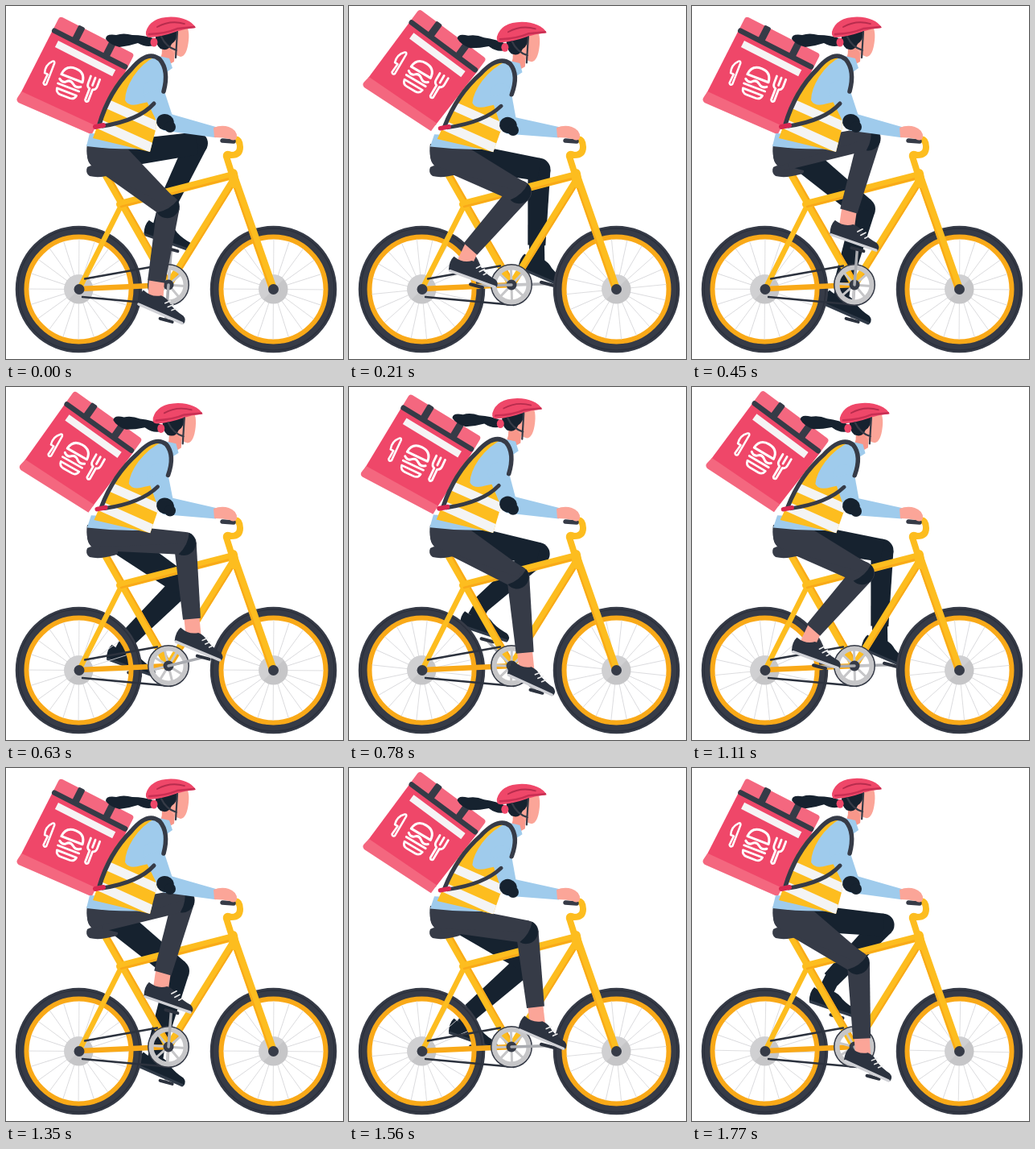
An HTML page with a canvas for the animation above (1.8 s loop, 419x438 px).

```html
<!DOCTYPE html>
<html>
<head>
<meta charset="utf-8">
<style>
html, body { margin: 0; width: 100%; height: 100%; overflow: hidden; background: #fff }
canvas { display: block }
</style>
</head>
<body>
<canvas id="stage" width="419" height="438"></canvas>
<script>
const c = document.getElementById('stage').getContext('2d');
const TAU = Math.PI * 2, RAD = Math.PI / 180;
const DARK = '#363b47', NAVY = '#16222f', YELLOW = '#fdbd1f', AMBER = '#f9a918',
  RED = '#ef4769', PINK = '#f4677f', SKIN = '#fba598', BLUE = '#9fcbec', GREY = '#c6c6c8';

function fill(d, color) {
  c.fillStyle = color;
  c.fill(new Path2D(d));
}

function line(d, color, w, cap = 'round') {
  c.strokeStyle = color;
  c.lineWidth = w;
  c.lineCap = cap;
  c.lineJoin = 'round';
  c.stroke(new Path2D(d));
}

function disc(x, y, r, color, ry = r, turn = 0) {
  c.fillStyle = color;
  c.beginPath();
  c.ellipse(x, y, r, ry, turn, 0, TAU);
  c.fill();
}

function ring(x, y, r, color, w) {
  c.strokeStyle = color;
  c.lineWidth = w;
  c.beginPath();
  c.arc(x, y, r, 0, TAU);
  c.stroke();
}

function rect(x, y, w, h, color, r = 0) {
  c.fillStyle = color;
  c.beginPath();
  c.roundRect(x, y, w, h, r);
  c.fill();
}

// Draws in a temporary coordinate system
function group(x, y, turn, draw) {
  c.save();
  c.translate(x, y);
  c.rotate(turn);
  draw();
  c.restore();
}

// Upper body shears forward while the waist stays in place
function leaning(lean, draw) {
  c.save();
  c.transform(1, 0, -.08 * lean, 1 - .05 * lean, 14.8 * lean, 9.25 * lean);
  draw();
  c.restore();
}

// Tapered limb with a rounded start
function limb([x, y], r, [u, v], s, color) {
  const a = Math.atan2(v - y, u - x) + Math.PI / 2, p = Math.cos(a), q = Math.sin(a);
  disc(x, y, r, color);
  fill(`M${x + p * r} ${y + q * r}L${u + p * s} ${v + q * s}L${u - p * s} ${v - q * s}L${x - p * r} ${y - q * r}Z`, color);
}

// Turn of wheels and crank, lagging just before each round is completed
function rotation(ms) {
  const t = ms % 900;
  const deg = t < 780 ? t * .4 : t < 870 ? 312 + (t - 780) * 12 / 90 : 324 + (t - 870) * 1.2;
  return deg * RAD;
}

function wheel(x, turn) {
  const y = 351.5;
  ring(x, y, 73, DARK, 11.5);
  ring(x, y, 75.5, '#2b303c', 1.5);
  ring(x, y, 65, AMBER, 6);
  group(x, y, turn, () => {
    for (let i = 0; i < 20; i++) {
      c.rotate(TAU / 20);
      line('M17 0L62 0', '#d6d6d9', .8);
    }
  });
  disc(x, y, 18, GREY);
  fill(`M${x - 13} ${y + 13}A18 18 0 0 1 ${x + 13} ${y - 13}L${x} ${y}Z`, '#d0d0d2');
}

function shoe(x, y, a, far) {
  group(x, y, (20 + 3 * Math.cos(a - .9)) * RAD, () => {
    fill('M-14 25Q-17 14 -13 7Q0 12 10 5Q18 5 25 11Q34 16 45 18Q51 21 49 27Z', far ? NAVY : '#2c3340');
    line('M-12 25.5L47 27', far ? '#303a48' : '#d0d1d6', 3.4);
    if (!far) line('M18 12L23 7M23 15L28 10M29 17L33 13', '#eee', 1.6);
  });
}

function leg(hip, a, far) {
  const thigh = 105, shin = 103, color = far ? NAVY : DARK;
  const ax = 189 + 44 * Math.cos(a), ay = 307 + 44 * Math.sin(a);
  const dx = ax - hip[0], dy = ay - hip[1], d = Math.hypot(dx, dy);
  const bend = Math.acos((thigh * thigh + d * d - shin * shin) / (2 * thigh * d));
  const k = Math.atan2(dy, dx) - bend;
  const knee = [hip[0] + thigh * Math.cos(k), hip[1] + thigh * Math.sin(k)];
  const ux = (ax - knee[0]) / shin, uy = (ay - knee[1]) / shin;
  line(`M${ax - ux * 12} ${ay - uy * 12}L${ax + ux * 4 + 1} ${ay + uy * 4 + 8}`, far ? NAVY : SKIN, 19, 'butt');
  shoe(ax, ay, a, far);
  limb(knee, 14, [ax - ux * 9, ay - uy * 9], 11, color);
  limb(hip, 17, knee, 14, color);
  if (!far) {
    const px = knee[0] + 13 * Math.sin(k), py = knee[1] - 13 * Math.cos(k);
    fill(`M101 171L152 178L${px} ${py}L${knee[0]} ${knee[1]}L108 199Q98 190 101 171Z`, DARK);
    group(...knee, k, () => fill('M4 -13.4A14 14 0 0 1 -7 14Q4 2 4 -13.4Z', NAVY));
  }
}

function crank(a) {
  const x = 202 + 44 * Math.cos(a), y = 346 + 44 * Math.sin(a);
  line(`M202 346L${x} ${y}`, '#a9abb0', 3.5);
  line(`M${x - 7} ${y - 2}L${x + 8} ${y + 2}`, '#2c323e', 4);
}

function bike(a) {
  // Frame
  line('M91 351L202 346', AMBER, 6.5);
  line('M91 351L144 246', YELLOW, 6.5);
  line('M122 206L202 346', YELLOW, 9.5);
  line('M125 205L205 343', AMBER, 2);
  line('M202 346L283 216', YELLOW, 9);
  line('M205 347L286 218', AMBER, 2);
  line('M142 246L282 210', YELLOW, 10);
  line('M143 249L282 213', AMBER, 2.5);
  line('M283 211L332 351', YELLOW, 10);
  line('M280 214L328 350', AMBER, 2);
  line('M282 208L284 220', YELLOW, 12);
  line('M281 209L275 190Q271 181 280 185Q291 185 291 175Q291 166 285 165', YELLOW, 8);
  fill('M101 200Q107 196 119 199L139 204Q140 208 134 209Q116 214 104 211Q98 207 101 200Z', DARK);
  // Chain and chainring
  line('M98 338.5L188 322.5M95 361L205 371', '#2c323e', 2.3);
  ring(202, 346, 25, DARK, 2);
  ring(202, 346, 21.5, GREY, 6);
  group(202, 346, a, () => {
    for (let i = 0; i < 8; i++) {
      c.rotate(TAU / 8);
      line('M6 0L20 0', GREY, 3);
    }
  });
  for (const x of [91, 332.5]) disc(x, 351.5, 6.5, DARK);
  disc(202, 346, 6.5, DARK);
}

function pack(lean) {
  group(130, 130, .17 * lean, () => {
    c.translate(-130, -130);
    group(67, 12.5, 27 * RAD, () => {
      rect(0, 0, 104, 22, PINK, 4);
      fill('M0 20H104L102 104L0 107Z', RED);
      fill('M0 105L102 101V113L3 119Q-2 118 -1 113Z', PINK);
      rect(-1, 16, 105, 6.5, DARK, 3);
      for (const x of [26, 69]) rect(x, -1, 9, 20, DARK, 2);
      rect(12, 28, 80, 9, '#f6f4f5');
      // Cutlery and burger
      group(49, 68, -6 * RAD, () => {
        c.translate(-52, -70);
        line('M22 53Q15 60 18 70L22 70L21 82Q23 85 25 82V54Q24 51 22 53Z', '#fff', 2.5);
        line('M38 64Q39 51 52 51Q65 51 66 64Z', '#fff', 3);
        line('M38 70Q43 74 47 70T56 70T66 70', '#fff', 3);
        line('M38 76H66M39 82H65Q64 88 58 88H46Q40 88 39 82Z', '#fff', 2.7);
        line('M73 53V62Q73 67 77 68V83Q79 86 81 83V68Q85 67 85 62V53M79 53V63', '#fff', 2.8);
      });
    });
  });
}

function head(lean, bob) {
  c.save();
  c.translate(10 * lean, 6 * lean + bob);
  group(184, 44, .12 * lean, () =>
    fill('M-60 -3Q-60 -10 -47 -8Q-38 -11 -27 -8Q-12 -8 2 -3V4Q-8 9 -20 2Q-32 6 -43 7Q-55 4 -60 -3Z', NAVY));
  fill('M193 46L211 44L209 69Q200 76 190 68Q196 61 193 46Z', '#f8978a');
  fill('M200 33L226 28Q228 34 227 43Q225 62 217 63Q207 61 204 50Z', SKIN);
  fill('M186 36L214 30Q213 43 206 47Q202 57 192 53Q185 47 186 36Z', NAVY);
  disc(184, 45, 4.5, RED, 5.5);
  fill('M174 32Q179 14 205 13.5Q228 14 236 27Q223 28 211 32Q194 38 179 39Q173 39 174 32Z', RED);
  line('M188 26Q204 17 222 22', '#b72c4d', 1.8);
  line('M178 35Q199 34 213 28L234 26', '#c92f53', 2.5);
  line('M213 32L211 64M193 38Q199 51 212 55', DARK, 2.2);
  c.restore();
}

function torso() {
  fill('M104 158L100 174Q140 179 179 177L182 162Z', BLUE);
  fill('M186 61L203 65L207 77L197 84Z', BLUE);
  const vest = 'M158 73Q178 56 192 64Q203 77 195 104L184 124L187 150L179 181L108 164Q114 148 121 126Q134 94 158 73Z';
  fill(vest, YELLOW);
  c.save();
  c.clip(new Path2D(vest));
  line('M116 117L192 151', '#f4f4f4', 11.5);
  line('M106 142L190 180', '#f4f4f4', 12);
  c.restore();
}

function sleeve() {
  fill('M187 62Q170 70 158 88Q148 104 148 117Q153 126 168 121L186 117L197 100Q199 74 187 62Z', BLUE);
}

function straps() {
  line('M116 147Q128 106 156 78Q176 54 191 66Q203 80 196 106', DARK, 5.5);
  line('M184 121Q165 142 120 149', DARK, 5);
  line('M111 150L121 148', '#d92852', 6);
}

function arm(lean) {
  const ey = 144 + 4 * lean;
  limb([183 + 6 * lean, 105 + 4 * lean], 13, [199, ey], 10, BLUE);
  limb([200, ey], 11, [262, 157], 6.5, BLUE);
  disc(198, ey, 11, NAVY, 10, .3);
  disc(204, ey + 6, 7, NAVY);
  line('M269 167L283 168', DARK, 5.5);
  fill('M258 151Q268 147 277 150Q288 154 287 163Q285 169 278 165Q270 163 259 163Z', SKIN);
}

function draw(ms) {
  const turn = rotation(ms), a = turn + 94 * RAD, sway = ms / 450 * TAU;
  const lean = Math.pow(.5 - .5 * Math.cos(sway), 1.4), bob = 2 * Math.sin(sway);
  c.fillStyle = '#fff';
  c.fillRect(0, 0, 419, 438);
  crank(a + Math.PI);
  leg([133, 185], a + Math.PI, true);
  wheel(90.5, turn);
  wheel(332.5, turn);
  bike(a);
  crank(a);
  leg([118, 186], a, false);
  pack(lean);
  head(lean, bob);
  leaning(lean, () => {
    torso();
    sleeve();
  });
  arm(lean);
  leaning(lean, straps);
}

const start = performance.now();
function tick() {
  draw((performance.now() - start) % 1800);
  requestAnimationFrame(tick);
}
tick();
</script>
</body>
</html>
```
